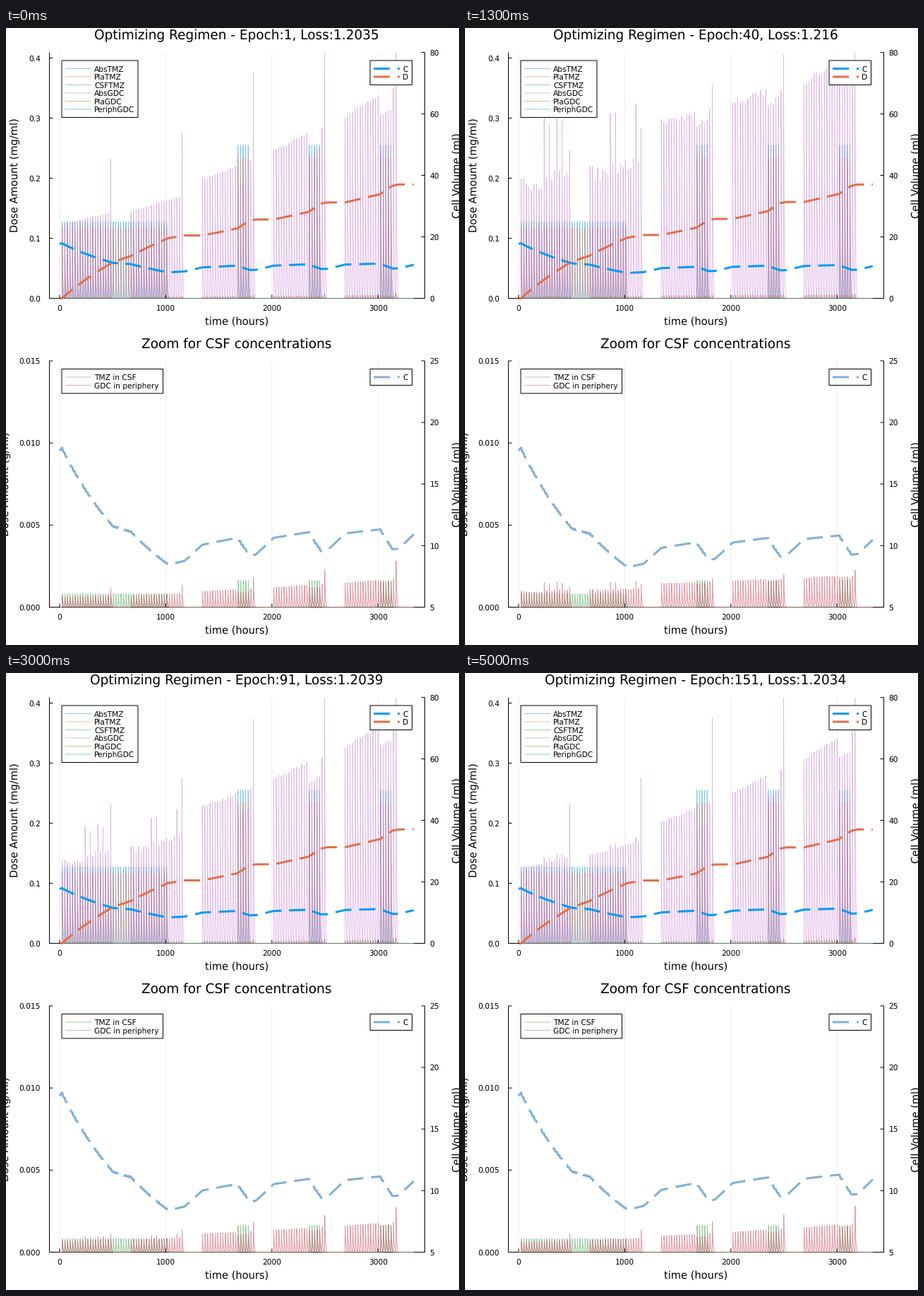
A matplotlib script for the animation above (5030 ms loop, 642x873 px).

```python
import math
import numpy as np
import matplotlib.pyplot as plt
from matplotlib.animation import FuncAnimation
from matplotlib.patches import Rectangle

W, H = 642, 873
EPOCHS, LOOP_MS = 151, 5030
PX = 0.72  # points per pixel at 100 dpi
plt.rcParams.update({
    "font.family": "DejaVu Sans", "text.hinting": "none",
    "path.simplify": False, "path.snap": False,
    "lines.solid_capstyle": "butt", "lines.dash_capstyle": "butt",
    "toolbar": "None",
})

LEFT, RIGHT = 61.5, 593.5
TOP_Y, TOP_0 = 34.5, 382.5
LOW_Y, LOW_0 = 471, 819.5
BLUE, ORANGE, GREEN, PURPLE = "#009afa", "#e36f47", "#3da44d", "#c371d2"
TAN, TEAL, ROSE, PALE = "#ac8d18", "#00a9ad", "#d05a70", "#7fb0da"

fig = plt.figure(figsize=(W / 100, H / 100), dpi=100, facecolor="white")
ax = fig.add_axes([0, 0, 1, 1])
ax.set_xlim(0, W)
ax.set_ylim(H, 0)
ax.axis("off")


def px(t):
    return 76 + 0.15042 * np.asarray(t, float)


def top_dose(v):
    return TOP_0 - 850 * v


def top_vol(v):
    return TOP_0 - 4.35 * v


def low_dose(v):
    return LOW_0 - 23233 * v


def low_vol(v):
    return LOW_0 - 17.43 * (v - 5)


def line(x, y, color, width=1.0, alpha=1.0, z=2, dash=False, clip=None):
    style = (0, (23 / width, 11 / width)) if dash else "-"
    art, = ax.plot(x, y, color=color, lw=width * PX, alpha=alpha, zorder=z, ls=style)
    if clip:
        art.set_clip_path(clip)
    return art


def text(x, y, s, size, ha="center", rot=0, z=8):
    return ax.text(x, y, s, fontsize=size * 0.954, ha=ha, va="baseline",
                   rotation=rot, rotation_mode="anchor", zorder=z)


def panel(y0, y1, left, right, ylabel, label_x):
    """Axes frame, ticks, grid and labels between pixel rows y0 (top) and y1."""
    mid = (y0 + y1) / 2
    for t in range(0, 3001, 1000):
        x = px(t)
        line([x, x], [y0, y1], "black", 0.7, 0.1, 1)
        line([x, x], [y1 - 5, y1], "black", z=6)
        text(x, y1 + 17.6, str(t), 8)
    for y, s in left:
        line([LEFT, LEFT + 5], [y, y], "black", z=6)
        text(49, y + 4, s, 8, "right")
    for y, s in right:
        line([RIGHT - 5, RIGHT], [y, y], "black", z=6)
        text(600.5, y + 4, s, 8, "left")
    line([LEFT, LEFT, RIGHT, RIGHT], [y0, y1, y1, y0], "black", z=1.5)
    text(327, y1 + 37.5, "time (hours)", 11)
    text(label_x, mid, ylabel, 11, rot=90)
    text(644, mid, "Cell Volume (ml)", 11, rot=90)
    box = Rectangle((LEFT, y0), RIGHT - LEFT, y1 - y0 + 1, fc="none", ec="none")
    return ax.add_patch(box)


def legend(x, y, w, rows, thick=False):
    h = 11.5 * (len(rows) + 1)
    ax.add_patch(Rectangle((x, y), w, h, fc="white", ec="black", lw=PX,
                           zorder=7, snap=False))
    for i, (name, color) in enumerate(rows):
        cy = y + 11.5 * (i + 1)
        line([x + 5, x + 42], [cy, cy], color, 3 if thick else 1,
             1 if thick else 0.5, 8, thick)
        text(x + 46, cy + 4, name, 8, "left")


top_box = panel(TOP_Y, TOP_0,
                [(top_dose(v / 10), f"{v / 10:.1f}") for v in range(5)],
                [(top_vol(v), str(v)) for v in range(0, 81, 20)],
                "Dose Amount (mg/ml)", 17)
low_box = panel(LOW_Y, LOW_0,
                [(low_dose(v / 200), f"{v / 200:.3f}") for v in range(4)],
                [(low_vol(v), str(v)) for v in range(5, 26, 5)],
                "Dose Amount (g/ml)", 4)
title = text(327, 16.5, "", 14)
text(327, 453, "Zoom for CSF concentrations", 14)

names = ["AbsTMZ", "PlaTMZ", "CSFTMZ", "AbsGDC", "PlaGDC", "PeriphGDC"]
legend(79, 46, 108, list(zip(names, [BLUE, ORANGE, GREEN, PURPLE, TAN, TEAL])))
legend(516, 46, 59.5, [("C", BLUE), ("D", ORANGE)], True)
legend(79, 482.5, 143.5, [("TMZ in CSF", GREEN), ("GDC in periphery", ROSE)])
legend(516, 482.5, 59.5, [("C", PALE)], True)

# Schedule: a 42 day TMZ course, then 5 double days late in each 28 day cycle
CYCLE = 28
DAYS = np.arange(1, 141)
cycle, step = DAYS // CYCLE, DAYS % CYCLE
boost = (cycle >= 2) & (step >= 14) & (step < 19)
on_gdc = (step <= 20) & (cycle < 5)
tmz = np.where(DAYS <= 42, 1.0, 0.0) + 2.0 * (boost & on_gdc)
gdc_days, tmz_days = DAYS[on_gdc], DAYS[tmz > 0]

# GDC plans: the tuned one climbs in every cycle, the flat one hardly changes
start = np.array([.122, .145, .197, .246, .303, 0])[cycle]
tuned = start * (1 + 0.0085 * step) - 0.035 * boost
last = step == 20
tuned[last] = 1.9 * start[last]
flat = 0.257 + 0.0006 * DAYS + 0.02 * last
rng = np.random.default_rng(5)
jitter = rng.uniform(-1, 1, len(DAYS))
strong = np.isin(DAYS, [10, 12, 15, 17, 36, 38, 46])
late = (cycle >= 2) & ~last


def plan(epoch):
    """GDC dose per day: jump to the flat plan, overshoot, settle on the tuned one."""
    if epoch <= 20:
        w, over = (epoch - 1) / 19, 0.0
    else:
        x = (epoch - 20) / 25
        w, over = math.exp(-(epoch - 20) / 28), x * math.exp(1 - x)
    dose = w * flat + (1 - w) * tuned + over * (0.05 * late + 0.1 * strong)
    dose = dose + jitter * np.where(cycle < 2, 0.015 * over, 0.002 + 0.01 * w)
    return dose * on_gdc


# Tumour model: slowing growth, steady GDC kill, TMZ kill fading over each day
DT = 4
t = np.arange(0, 3338, DT)
day_of = t // 24
tmz_kill = np.concatenate([[0], 0.0237 * np.sqrt(tmz)])
fade = np.exp(-np.arange(0, 24, DT) / 8)
tmz_rate = tmz_kill[day_of] * (fade / fade.mean())[(t % 24) // DT]


def simulate(dose):
    gdc_kill = np.concatenate([[0], (0.013 + 0.0105 * dose) * on_gdc])
    live, dead = 17.7, 0.0
    lives, deads = [], []
    for kill in (tmz_rate + gdc_kill[day_of]).tolist():
        lives.append(live)
        deads.append(dead)
        growth = 0.0197 - 0.0085 * math.log(live / 9.7)
        dead += 1.06 * kill * live * DT / 24
        live += (growth - kill) * live * DT / 24
    return np.array(lives), np.array(deads)


def pulses(days, rise, tau):
    """Pixel times and unit heights of one decaying pulse per dosing day."""
    s = np.concatenate([[0, rise], rise + np.linspace(0.2, 4.4, 8) ** 2])
    unit = np.concatenate([[0], np.exp(-(s[1:] - rise) / tau)])
    unit[-1] = 0
    x = np.concatenate([[0], (days[:, None] * 24 + s).ravel(), [3337]])
    return px(x), unit


def heights(amount, unit):
    return np.concatenate([[0], np.outer(amount, unit).ravel(), [0]])


def tmz_pulses(scale, rise, tau, y, color, width, z, clip):
    x, unit = pulses(tmz_days, rise, tau)
    line(x, y(heights(scale * tmz[tmz > 0], unit)), color, width, 0.55, z, clip=clip)


tmz_pulses(0.1275, 0.3, 2.5, top_dose, BLUE, 0.8, 2, top_box)
tmz_pulses(0.117, 1.0, 4.0, top_dose, ORANGE, 0.8, 2.1, top_box)
tmz_pulses(0.00081, 2.0, 6.0, low_dose, GREEN, 1, 2, low_box)
line(px([0, 3337]), [TOP_0, TOP_0], "#2f8f6a", 1, 0.65, 2.8)

abs_x, abs_unit = pulses(gdc_days, 0.3, 5.0)
per_x, per_unit = pulses(gdc_days, 2.0, 5.5)
abs_line = line([], [], PURPLE, 0.8, 0.52, 2.3, clip=top_box)
pla_line = line([], [], "#a8503c", 0.8, 0.55, 2.5, clip=top_box)
per_line = line([], [], ROSE, 1, 0.62, 2.3, clip=low_box)
c_top = line([], [], BLUE, 3, z=4, dash=True, clip=top_box)
d_top = line([], [], ORANGE, 3, z=4, dash=True, clip=top_box)
c_low = line([], [], PALE, 3, z=4, dash=True, clip=low_box)
vol_x = px(t)

loss_epochs = [1, 20, 40, 66, 91, 116, 151]
loss_values = [1.2035, 1.2175, 1.216, 1.2061, 1.2039, 1.2034, 1.2034]


def draw(i):
    epoch = i + 1
    loss = float(np.interp(epoch, loss_epochs, loss_values))
    daily = plan(epoch)
    dose = daily[on_gdc]
    live, dead = simulate(daily)

    title.set_text(f"Optimizing Regimen - Epoch:{epoch}, Loss:{round(loss, 4)}")
    abs_line.set_data(abs_x, top_dose(heights(dose, abs_unit)))
    pla_line.set_data(per_x, top_dose(heights(0.015 * dose, per_unit)))
    per_line.set_data(per_x, low_dose(heights(0.0049 * dose, per_unit)))
    c_top.set_data(vol_x, top_vol(live))
    d_top.set_data(vol_x, top_vol(dead))
    c_low.set_data(vol_x, low_vol(live))
    return title, abs_line, pla_line, per_line, c_top, d_top, c_low


anim = FuncAnimation(fig, draw, frames=EPOCHS, interval=LOOP_MS / EPOCHS,
                     repeat=True, repeat_delay=0, blit=False)
plt.show()
```
